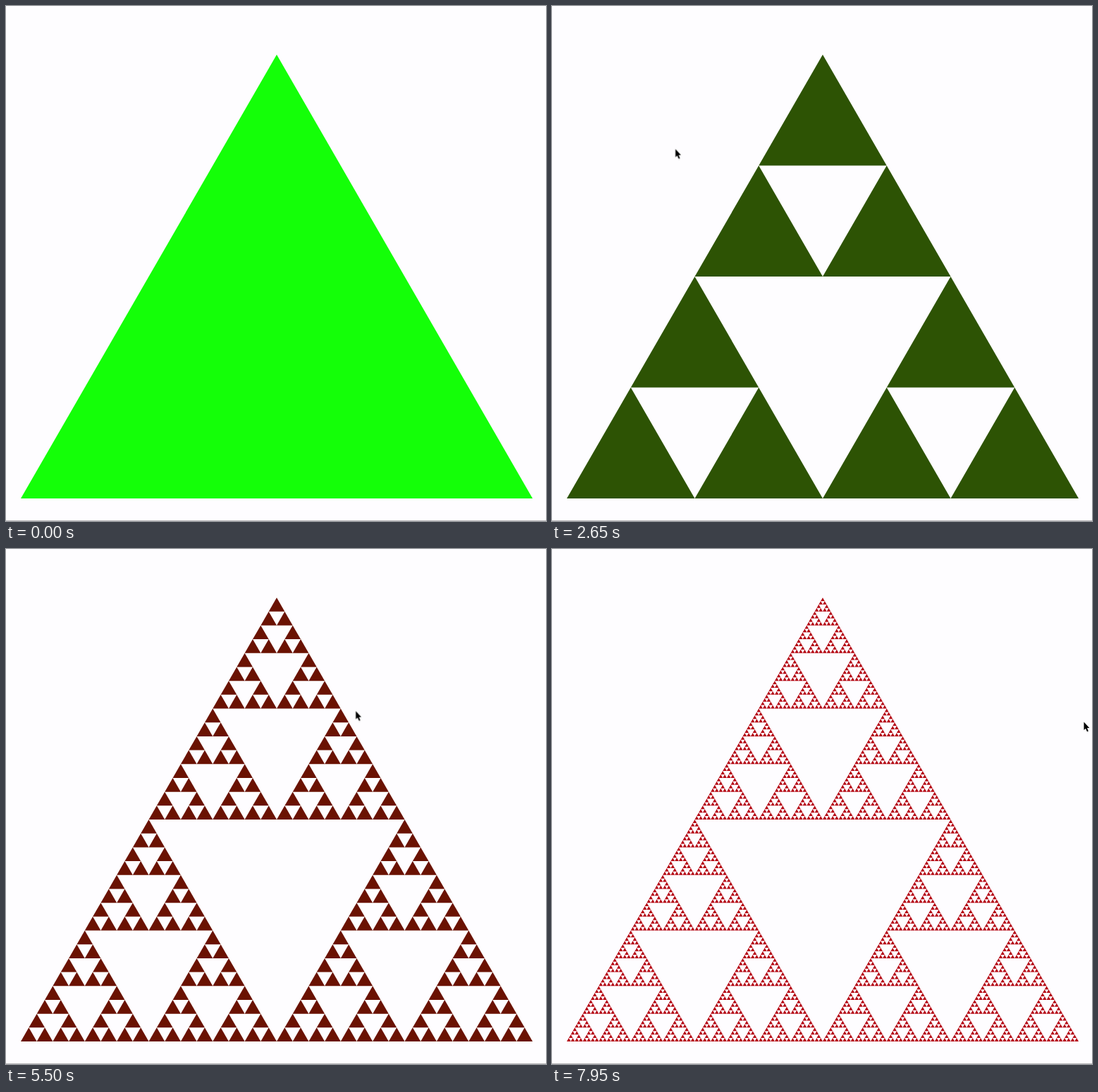
Write an HTML page without scripts that moves like this. It is 766 px wide and 731 px high and loops after 8 s.

```html
<!DOCTYPE html>
<html lang="en">
<head>
<meta charset="utf-8">
<title>Triangle subdivision</title>
<style>
  html, body { margin: 0; width: 100%; height: 100%; overflow: hidden; background: #fefdff; }
  svg { display: block; width: 766px; height: 731px; }

  /* one layer per depth, switched hard */
  .depth { visibility: hidden; animation: 8s step-end infinite; }
  .d0 { fill: #14ff08; animation-name: show0; }
  .d1 { fill: #0a8905; animation-name: show1; }
  .d2 { fill: #2d5304; animation-name: show2; }
  .d3 { fill: #443401; animation-name: show3; }
  .d4 { fill: #562400; animation-name: show4; }
  .d5 { fill: #6a1202; animation-name: show5; }
  .d6 { fill: #800206; animation-name: show6; }
  .d7 { fill: #b40412; animation-name: show7; }

  @keyframes show0 { 0% { visibility: visible } 16.25%, 100% { visibility: hidden } }
  @keyframes show1 { 0% { visibility: hidden } 16.25% { visibility: visible } 30%, 100% { visibility: hidden } }
  @keyframes show2 { 0% { visibility: hidden } 30% { visibility: visible } 41.875%, 100% { visibility: hidden } }
  @keyframes show3 { 0% { visibility: hidden } 41.875% { visibility: visible } 54.375%, 100% { visibility: hidden } }
  @keyframes show4 { 0% { visibility: hidden } 54.375% { visibility: visible } 65%, 100% { visibility: hidden } }
  @keyframes show5 { 0% { visibility: hidden } 65% { visibility: visible } 74.375%, 100% { visibility: hidden } }
  @keyframes show6 { 0% { visibility: hidden } 74.375% { visibility: visible } 85.625%, 100% { visibility: hidden } }
  @keyframes show7 { 0% { visibility: hidden } 85.625%, 100% { visibility: visible } }

  .pointer { animation: roam 8s linear infinite; }
  @keyframes roam {
    0%, 5.6% { transform: translate(-16px, 180px) }
    5.625% { transform: translate(0, 181px) }
    16.25% { transform: translate(57px, 192px) }
    20.625%, 24.9% { transform: translate(126.5px, 200.5px) }
    33.125% { transform: translate(174.5px, 202.5px) }
    46.875% { transform: translate(304px, 210px) }
    58.75% { transform: translate(385.5px, 223.5px) }
    78.75% { transform: translate(605.5px, 235.5px) }
    99.375%, 100% { transform: translate(754px, 245px) }
  }
</style>
</head>
<body>
<svg viewBox="0 0 766 731">
  <defs>
    <!-- each depth is three half-size copies of the one before -->
    <path id="t0" d="M0 0L363 630H-363Z"/>
    <g id="t1"><use href="#t0" transform="scale(.5)"/><use href="#t0" transform="translate(-181.5 315) scale(.5)"/><use href="#t0" transform="translate(181.5 315) scale(.5)"/></g>
    <g id="t2"><use href="#t1" transform="scale(.5)"/><use href="#t1" transform="translate(-181.5 315) scale(.5)"/><use href="#t1" transform="translate(181.5 315) scale(.5)"/></g>
    <g id="t3"><use href="#t2" transform="scale(.5)"/><use href="#t2" transform="translate(-181.5 315) scale(.5)"/><use href="#t2" transform="translate(181.5 315) scale(.5)"/></g>
    <g id="t4"><use href="#t3" transform="scale(.5)"/><use href="#t3" transform="translate(-181.5 315) scale(.5)"/><use href="#t3" transform="translate(181.5 315) scale(.5)"/></g>
    <g id="t5"><use href="#t4" transform="scale(.5)"/><use href="#t4" transform="translate(-181.5 315) scale(.5)"/><use href="#t4" transform="translate(181.5 315) scale(.5)"/></g>
    <g id="t6"><use href="#t5" transform="scale(.5)"/><use href="#t5" transform="translate(-181.5 315) scale(.5)"/><use href="#t5" transform="translate(181.5 315) scale(.5)"/></g>
    <g id="t7"><use href="#t6" transform="scale(.5)"/><use href="#t6" transform="translate(-181.5 315) scale(.5)"/><use href="#t6" transform="translate(181.5 315) scale(.5)"/></g>
  </defs>

  <rect width="766" height="731" fill="#fefdff"/>
  <rect y="730" width="766" height="1" fill="#b9b8ba"/>

  <g transform="translate(384 69)">
    <use class="depth d0" href="#t0"/>
    <use class="depth d1" href="#t1"/>
    <use class="depth d2" href="#t2"/>
    <use class="depth d3" href="#t3"/>
    <use class="depth d4" href="#t4"/>
    <use class="depth d5" href="#t5"/>
    <use class="depth d6" href="#t6"/>
    <use class="depth d7" href="#t7"/>
  </g>

  <g class="pointer">
    <path d="M0 1.5V13.5L2.8 11L5 16L7.4 15L5.2 10.2H9Z" fill="#000" opacity=".15"/>
    <path d="M.5 .5V12L3 9.7L5 14.3L6.9 13.5L5 9H8.3Z" fill="#000" stroke="#fff" stroke-width="1.6" paint-order="stroke"/>
  </g>
</svg>
</body>
</html>
```
